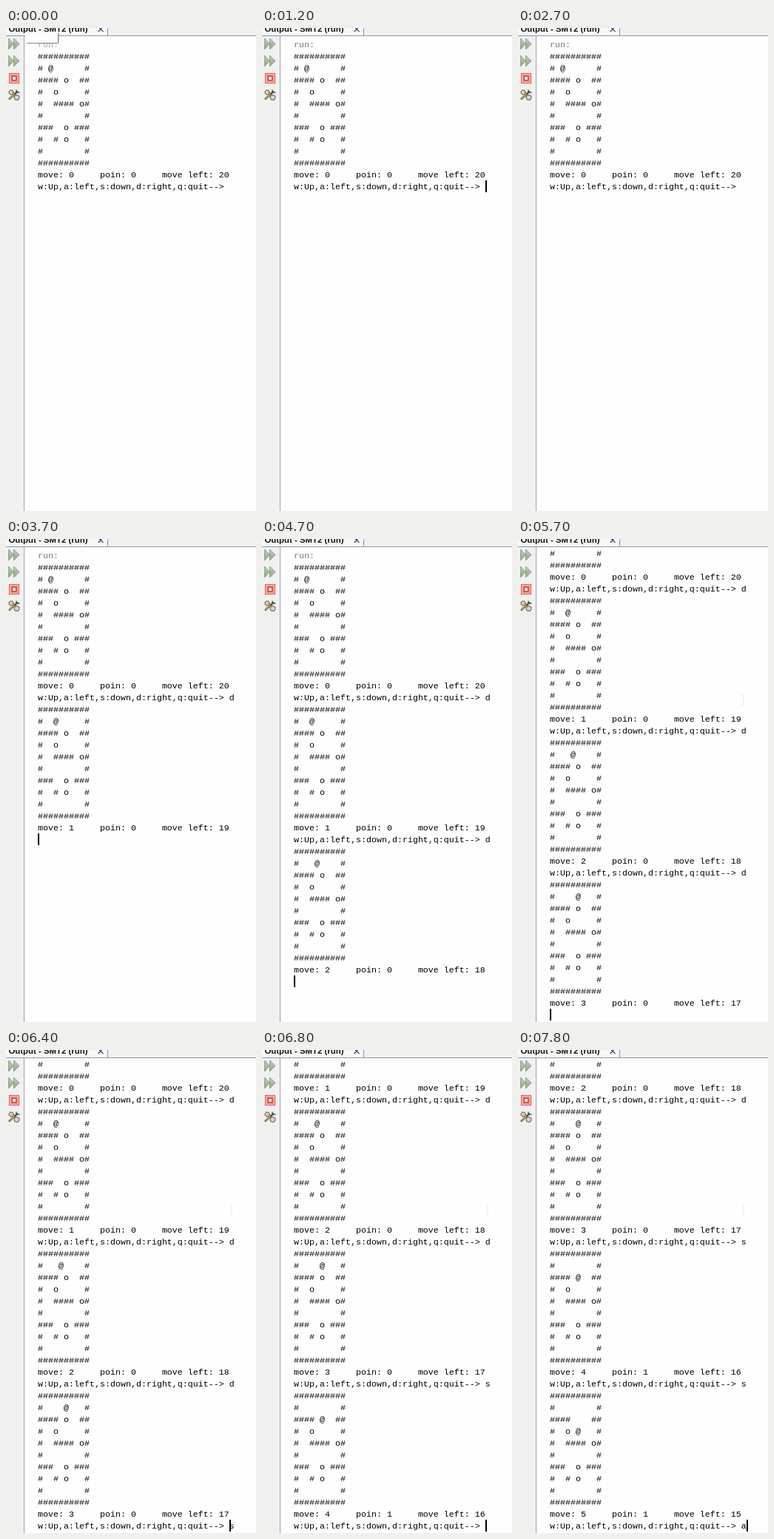
Write an HTML page that moves like this. It is 338 px wide and 653 px high and loops after 8000 ms.

```html
<!DOCTYPE html>
<html lang="en">
<head>
<meta charset="utf-8">
<title>Console maze</title>
<style>
  html, body { margin: 0; width: 100%; height: 100%; overflow: hidden; background: #fefefe; }
  #stage { position: relative; width: 338px; height: 653px; overflow: hidden; }
  #view { position: absolute; left: 25px; top: 11px; width: 313px; height: 642px; overflow: hidden; }
  #doc { position: absolute; left: 18px; top: 3px; }
  pre { margin: 0; position: relative; top: 1px; color: #000;
        font: 11.667px/16px "Liberation Mono", "Courier New", monospace; }
  pre span { color: #77777f; }
  #caret { position: absolute; width: 2px; height: 16px; background: #000; }
  svg { position: absolute; left: 0; top: 0; }
</style>
</head>
<body>
<div id="stage">
  <div id="view">
    <div id="doc">
      <pre><span>run:</span>
<b id="log" style="font-weight:400"></b></pre>
      <div id="caret"></div>
    </div>
  </div>
  <svg width="338" height="653" viewBox="0 0 338 653">
    <defs>
      <linearGradient id="green" x2="0" y2="1">
        <stop offset="0" stop-color="#c3cfba"/>
        <stop offset="1" stop-color="#92a488"/>
      </linearGradient>
      <g id="play" fill="url(#green)" stroke="#8b9a83" stroke-width=".9" stroke-linejoin="round">
        <path d="M3.5 .5L10.5 8L3.5 15.5z"/>
        <path d="M10.5 .5L18 8L10.5 15.5z"/>
      </g>
    </defs>

    <!-- side bar and tab strip -->
    <path d="M0 11H24V653H0z" fill="#f0f0f0"/>
    <path d="M24.5 11V653" stroke="#a0a0a4"/>
    <path d="M0 0H338V10H0z" fill="#f0f0f0"/>
    <path d="M0 0H137V10H0z" fill="#f8f8f9"/>
    <path d="M0 10.5H338M137.5 0V10" stroke="#8d96a5"/>
    <text x="3.5" y="5" font-family="Liberation Sans, Arial, sans-serif" font-size="11.4" font-weight="700" fill="#111">Output - SMT2 (run)</text>
    <path d="M124.5 -2L131.5 5M131.5 -2L124.5 5" stroke="#3f4f68" stroke-width="1.3"/>

    <!-- tool buttons -->
    <use href="#play" y="13.5"/>
    <use href="#play" y="36.5"/>
    <rect x="4.5" y="61.5" width="13" height="13" fill="#f7d4cf" stroke="#d9503f"/>
    <rect x="6" y="63" width="10" height="10" fill="#ef7b6c"/>
    <rect x="8.5" y="65.5" width="5" height="5" fill="#fff" stroke="#c93c2c"/>
    <g fill="none" stroke="#55534c">
      <circle cx="7" cy="87" r="3" fill="#e6cf94" stroke-width="1.3" stroke-dasharray="1.6 .8"/>
      <circle cx="14.5" cy="94" r="3.4" fill="#d9d9d9" stroke-width="1.5" stroke-dasharray="1.8 .8"/>
      <path d="M4 96.5L11 90L16 85.5" stroke-width="2.4"/>
      <path d="M4.5 96L11 90" stroke="#d9a441" stroke-width="1.2"/>
      <path d="M14 83.5V87H18.5" stroke-width="1.4"/>
    </g>

    <g id="tip">
      <path d="M29 19H72V7H70V20H29z" fill="#8f8f8f" opacity=".45"/>
      <path d="M26 7H70V20H26z" fill="#fdfdfd"/>
      <path d="M28 20.5H70.5V7" fill="none" stroke="#858585"/>
      <path d="M42 21H71V29H42z" fill="#fefefe" opacity=".4"/>
    </g>
    <path id="beam" d="M302.5 210.5H304.5M305.5 210.5H307.5M305 211V224M302.5 224.5H304.5M305.5 224.5H307.5" stroke="#e9e9ed" fill="none"/>
  </svg>
</div>
<script>
const LOOP = 8000, CELL = 7, ROW = 16, BLOCK = 12;
const MAZE = [
  "##########",
  "#        #",
  "#### o  ##",
  "#  o     #",
  "#  #### o#",
  "#        #",
  "###  o ###",
  "#  # o   #",
  "#        #",
  "##########"
];
const PROMPT = "w:Up,a:left,s:down,d:right,q:quit--> ";
const KEYS = "dddssa";
const STEP = { d: [1, 0], s: [0, 1], a: [-1, 0] };

// Per turn: board printed, prompt shown, key typed, enter pressed
const TURNS = [
  [0, 0, 3300, 3500],
  [3700, 4000, 4300, 4500],
  [4700, 5000, 5400, 5500],
  [5700, 6000, 6300, 6400],
  [6600, 6800, 7200, 7300],
  [7500, 7700, 7800, LOOP]
];
// Caret blinking while the first prompt waits: on, off
const BLINKS = [[1200, 1700], [2200, 2700], [3100, 3300]];

const boards = [];
const grid = MAZE.map(row => [...row]);
let x = 2, y = 1, points = 0;
TURNS.forEach((_, n) => {
  if (n) {
    const [dx, dy] = STEP[KEYS[n - 1]];
    x += dx;
    y += dy;
  }
  if (grid[y][x] === "o") {
    points++;
    grid[y][x] = " ";
  }
  const rows = grid.map((row, j) => row.map((c, i) => i === x && j === y ? "@" : c).join(""));
  const gap = " ".repeat(5);
  rows.push(`move: ${n}${gap}poin: ${points}${gap}move left: ${20 - n}`);
  boards.push(rows.join("\n") + "\n");
});

const el = id => document.getElementById(id);
const log = el("log"), caret = el("caret"), doc = el("doc");
let shown = "";

function draw(t) {
  let turn = 0;
  while (turn < TURNS.length - 1 && t >= TURNS[turn + 1][0]) turn++;
  const [, ask, type, enter] = TURNS[turn];

  let text = "";
  for (let n = 0; n < turn; n++) text += boards[n] + PROMPT + KEYS[n] + "\n";
  text += boards[turn];
  if (t >= ask) text += PROMPT;
  if (t >= type) text += KEYS[turn];
  if (text !== shown) log.textContent = shown = text;

  // Enter sends the caret back to the start of the input
  let col = 0;
  if (t >= ask) col = PROMPT.length;
  if (t >= type && t < enter) col++;
  const lit = t >= TURNS[0][2] || BLINKS.some(([on, off]) => t >= on && t < off);
  const row = BLOCK * (turn + 1);
  caret.style.left = col * CELL + "px";
  caret.style.top = row * ROW + "px";
  caret.style.visibility = lit ? "visible" : "hidden";

  const scroll = Math.max(0, 14 + row * ROW - 635);
  doc.style.top = 3 - scroll + "px";
  el("tip").style.visibility = t < 100 ? "visible" : "hidden";
  el("beam").style.visibility = t >= TURNS[3][0] ? "visible" : "hidden";
}

const start = performance.now();
function tick() {
  draw((performance.now() - start) % LOOP);
  requestAnimationFrame(tick);
}
tick();
</script>
</body>
</html>
```
